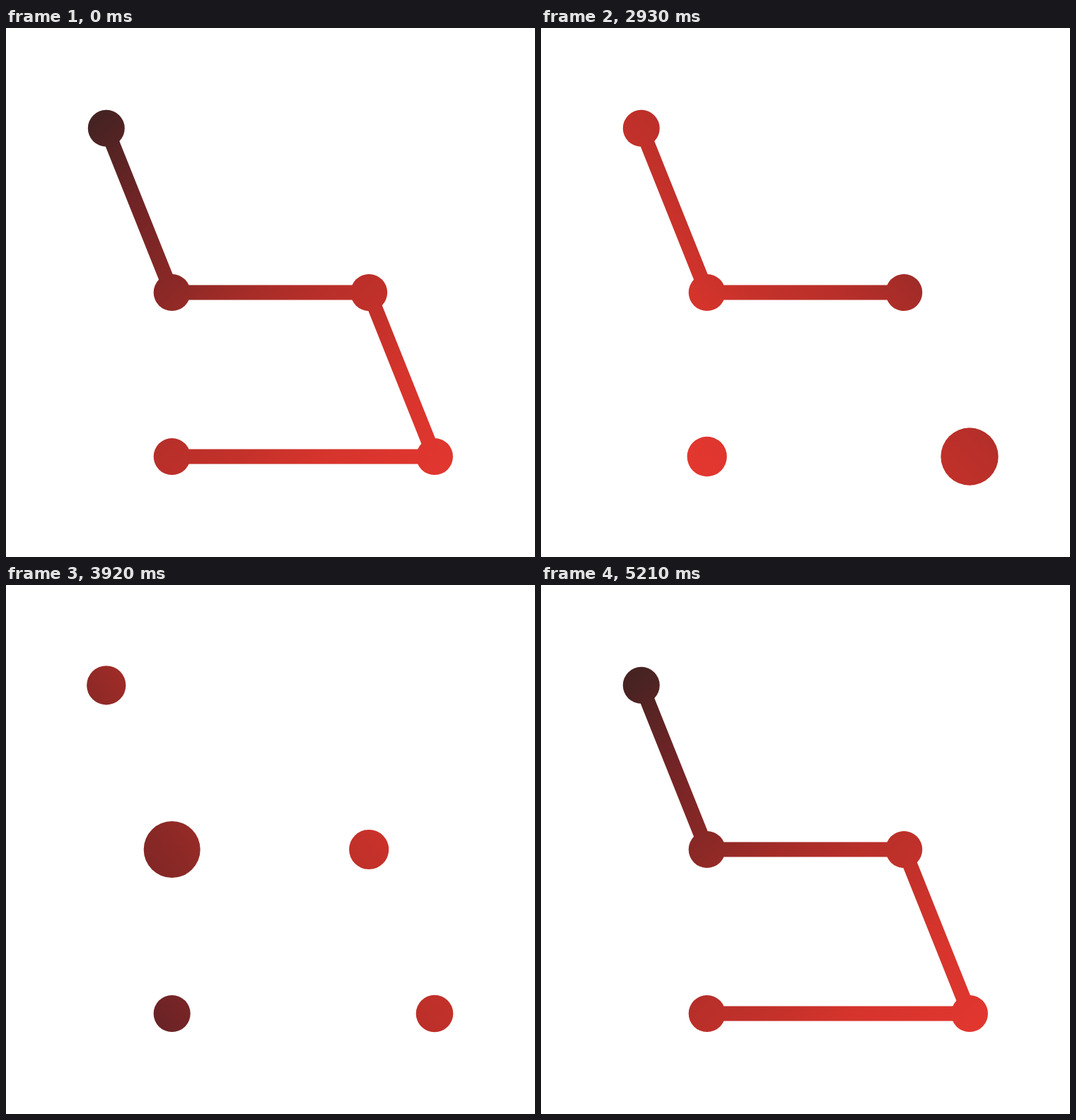
Animation, 748 px wide and 748 px high, one loop 5.24 s. Source, as an HTML page:

```html
<!DOCTYPE html>
<html lang="en">
<head>
<meta charset="utf-8">
<title>Linked dots</title>
<style>
  html, body { margin: 0; width: 100%; height: 100%; overflow: hidden; background: #fff; }
  svg { display: block; width: 100vw; height: 100vh; }
  line { stroke: url(#tint); stroke-width: 21; stroke-linecap: round; }
  circle { fill: url(#tint); }
</style>
</head>
<body>
<svg viewBox="0 0 748 748">
  <defs>
    <linearGradient id="tint" gradientUnits="userSpaceOnUse" x1="-400" y1="0" x2="400" y2="0"></linearGradient>
  </defs>
</svg>
<script>
const LOOP = 5240, FIRST = 2030, STEP = 30;
const RADIUS = 26, SWELL = 16.5, RISE = 405;
const ERASE = 385, DRAW_START = 3987, DRAW = 1100;
const SPIN_START = 2000, SPIN = 2750;

// Nodes in path order, with the times at which each one pulses
const nodes = [
  { x: 234.7, y: 606, pulses: [2006, 3987] },
  { x: 606, y: 606, pulses: [2504] },
  { x: 513.2, y: 374, pulses: [2994] },
  { x: 234.7, y: 374, pulses: [3488] },
  { x: 141.8, y: 141.8, pulses: [3906] }
];
const stops = [
  [-400, '#462322'], [-271, '#742426'], [-155, '#8c2926'], [-80, '#a52c28'],
  [0, '#b92f2a'], [75, '#c3312a'], [155, '#d5342c'], [270, '#df362f'], [400, '#e73a2f']
];

const svg = document.querySelector('svg');
const tint = document.getElementById('tint');
const clamp = v => Math.min(1, Math.max(0, v));
const sineOut = v => Math.sin(clamp(v) * Math.PI / 2);
const sineInOut = v => (1 - Math.cos(clamp(v) * Math.PI)) / 2;

function add(parent, tag, attrs) {
  const el = document.createElementNS('http://www.w3.org/2000/svg', tag);
  set(el, attrs);
  return parent.appendChild(el);
}

function set(el, attrs) {
  for (const key in attrs) el.setAttribute(key, attrs[key]);
}

for (const [pos, color] of stops) {
  add(tint, 'stop', { offset: (pos + 400) / 800, 'stop-color': color });
}

let total = 0;
const links = nodes.slice(1).map((to, i) => {
  const from = nodes[i];
  const length = Math.hypot(to.x - from.x, to.y - from.y);
  const link = { from, to, length, offset: total, el: add(svg, 'line', {}) };
  total += length;
  return link;
});
for (const n of nodes) n.el = add(svg, 'circle', { cx: n.x, cy: n.y, r: RADIUS });

// Quick swell, then an elastic return
function pulse(t) {
  if (t <= 0) return 0;
  if (t < RISE) return SWELL * (1 - (1 - t / RISE) ** 3);
  const u = t - RISE;
  return SWELL * 2 ** (-u / 185) * Math.cos(u / 485 * 2 * Math.PI);
}

function placeLink(link, a, b) {
  const { from, to, el } = link;
  const at = (key, f) => from[key] + (to[key] - from[key]) * f;
  el.style.display = b - a > 0.001 ? '' : 'none';
  set(el, { x1: at('x', a), y1: at('y', a), x2: at('x', b), y2: at('y', b) });
}

function render(time) {
  const t = time < FIRST ? 0 : FIRST + Math.floor((time - FIRST) / STEP) * STEP;
  const rest = t === 0 || t >= LOOP - STEP;

  for (const n of nodes) {
    const grow = rest ? 0 : n.pulses.reduce((sum, start) => sum + pulse(t - start), 0);
    n.el.setAttribute('r', RADIUS + grow);
  }

  const drawn = total * sineOut((t - DRAW_START) / DRAW);
  for (const link of links) {
    if (rest) placeLink(link, 0, 1);
    else if (t < DRAW_START) placeLink(link, sineOut((t - link.from.pulses[0]) / ERASE), 1);
    else placeLink(link, 0, clamp((drawn - link.offset) / link.length));
  }

  const angle = 45 + 360 * sineInOut((t - SPIN_START) / SPIN);
  tint.setAttribute('gradientTransform', `translate(434 394) rotate(${angle})`);
}

const begin = performance.now();
function tick() {
  render((performance.now() - begin) % LOOP);
  requestAnimationFrame(tick);
}
tick();
</script>
</body>
</html>
```
